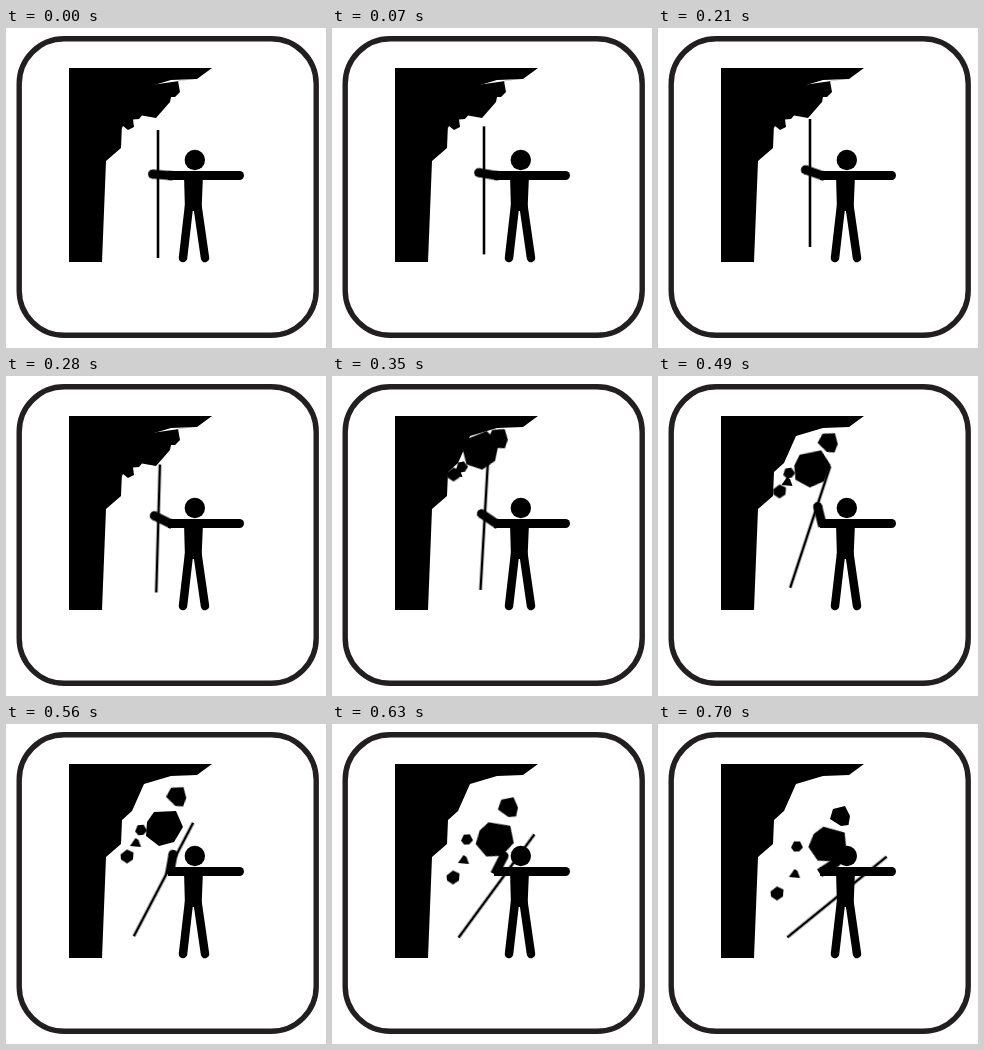
An HTML page for the animation above (1.2 s loop, 320x320 px).

```html
<!DOCTYPE html>
<html lang="en">
<head>
<meta charset="utf-8">
<title>Falling rocks</title>
<style>
html, body { margin: 0; width: 100%; height: 100%; overflow: hidden; background: #fff; }
svg { display: block; width: 100%; height: 100%; }

/* Poses p0..p6; each stretch between them advances in 70 ms ticks. */
.move { animation: move 1200ms -1ms infinite step-end; }
@keyframes move {
  0% { transform: var(--p0); animation-timing-function: steps(3, end); }
  17.5% { transform: var(--p1); animation-timing-function: steps(2, end); }
  29.166% { transform: var(--p2); animation-timing-function: steps(2, end); }
  40.833% { transform: var(--p3); }
  46.666% { transform: var(--p4); }
  52.5% { transform: var(--p5); }
  58.333%, 100% { transform: var(--p6); }
}

/* Rocks rest until the pole dislodges them. */
.rock { animation: fall 1200ms -1ms infinite step-end; }
@keyframes fall {
  0% { transform: var(--p2); }
  29.166% { transform: var(--p2); animation-timing-function: steps(2, end); }
  40.833% { transform: var(--p3); }
  46.666% { transform: var(--p4); }
  52.5% { transform: var(--p5); }
  58.333%, 100% { transform: var(--p6); }
}

/* Solid overhang before the rocks come loose. */
#overhang { animation: loosen 1200ms -1ms infinite step-end; }
@keyframes loosen {
  0% { visibility: visible; }
  29.166%, 100% { visibility: hidden; }
}
/* Loose rocks sit slightly outside the solid outline. */
#rocks { animation: appear 1200ms -1ms infinite step-end; }
@keyframes appear {
  0% { visibility: hidden; }
  29.166%, 100% { visibility: visible; }
}

#pole {
  --p0: translate(152px, 166px) rotate(0deg);
  --p1: translate(152px, 155px) rotate(0deg);
  --p2: translate(152.2px, 150px) rotate(3.3deg);
  --p3: translate(152.2px, 151px) rotate(18.2deg);
  --p4: translate(157.5px, 155.5px) rotate(27.6deg);
  --p5: translate(164.5px, 162px) rotate(36.3deg);
  --p6: translate(179px, 173px) rotate(50.9deg);
}
#forearm {
  --p0: translate(164px, 147.5px) rotate(4.6deg);
  --p1: translate(164px, 147.5px) rotate(19deg);
  --p2: translate(164px, 147.5px) rotate(34deg);
  --p3: translate(164px, 147.5px) rotate(76deg);
  --p4: translate(164px, 147.5px) rotate(100deg);
  --p5: translate(164px, 147.5px) rotate(117deg);
  --p6: translate(164px, 147.5px) rotate(147deg);
}
#boulder {
  --p2: translate(149px, 75px) rotate(-19deg);
  --p3: translate(154px, 93px) rotate(-9deg);
  --p4: translate(158px, 104px) rotate(0deg);
  --p5: translate(163px, 116px) rotate(12deg);
  --p6: translate(170px, 121px) rotate(18deg);
}
#upper {
  --p2: translate(166px, 62px) rotate(10deg);
  --p3: translate(170px, 66px) rotate(12deg);
  --p4: translate(170.5px, 72px) rotate(12deg);
  --p5: translate(176px, 83px) rotate(3deg);
  --p6: translate(182px, 92px) rotate(0deg);
}
#pebble {
  --p2: translate(130px, 91px) rotate(-12deg);
  --p3: translate(131px, 97px) rotate(-8deg);
  --p4: translate(135px, 106px) rotate(-4deg);
  --p5: translate(135px, 115.5px) rotate(-2deg);
  --p6: translate(139px, 122.5px) rotate(0deg);
}
#shard {
  --p2: translate(125px, 97px) rotate(0deg);
  --p3: translate(129px, 106px) rotate(0deg);
  --p4: translate(129.5px, 119px) rotate(0deg);
  --p5: translate(131.5px, 136px) rotate(0deg);
  --p6: translate(136.5px, 150px) rotate(0deg);
}
#lower {
  --p2: translate(121.5px, 98.5px) rotate(0deg);
  --p3: translate(121.5px, 115.5px) rotate(0deg);
  --p4: translate(121px, 132.5px) rotate(0deg);
  --p5: translate(121px, 153.5px) rotate(0deg);
  --p6: translate(119px, 169.5px) rotate(0deg);
}
</style>
</head>
<body>
<svg viewBox="0 0 320 320">
  <rect x="13.2" y="10.8" width="297" height="296.5" rx="45" fill="none" stroke="#231f20" stroke-width="5.4"/>

  <path d="M63 40H206L191 51L165 52L138 60L126 87L116 96L115 120L100 133L96 234H63Z"/>
  <path id="overhang" d="M138 58L191 50.500L172 53L174 64L169 69L165 69L164 74L150 90L136 87.500L133 91L127 91.500L128 99L122 102L117 98L115.500 101L115 94L126 85Z"/>

  <g id="rocks">
    <path id="boulder" class="rock" d="M-10-16L12-17L19-1L10 14L-5 18L-18 8L-17-6Z"/>
    <path id="upper" class="rock" d="M-10 3L-7-7L5-10L10 0L8.500 9L1 10Z"/>
    <path id="pebble" class="rock" d="M-6 1L-3-5L3-5L6 1L2 5L-3 5Z"/>
    <path id="shard" class="rock" d="M-5.500 3L0-5L3-3L5.500 4Z"/>
    <path id="lower" class="rock" d="M-6.500-2L0-7L6.500-4L6 3L0 7L-6 3Z"/>
  </g>

  <path id="pole" class="move" d="M0-64V64" stroke="#000" stroke-width="2.6"/>

  <g stroke="#000" stroke-linecap="round">
    <circle cx="188.800" cy="132" r="10.200" stroke="none"/>
    <path d="M178 147H197L195.500 183H179Z" stroke="none"/>
    <path d="M162 143H175V152H162Z" stroke="none"/>
    <path d="M170 147.500H233.500" stroke-width="9"/>
    <path d="M183 178L177 230M191.500 178L199 230" stroke-width="8.500"/>
    <g id="forearm" class="move" stroke="none">
      <path d="M3-4.500H-17.500V4.500H3Z"/>
      <circle cx="-17.500" r="4.500"/>
    </g>
  </g>
</svg>
</body>
</html>
```
